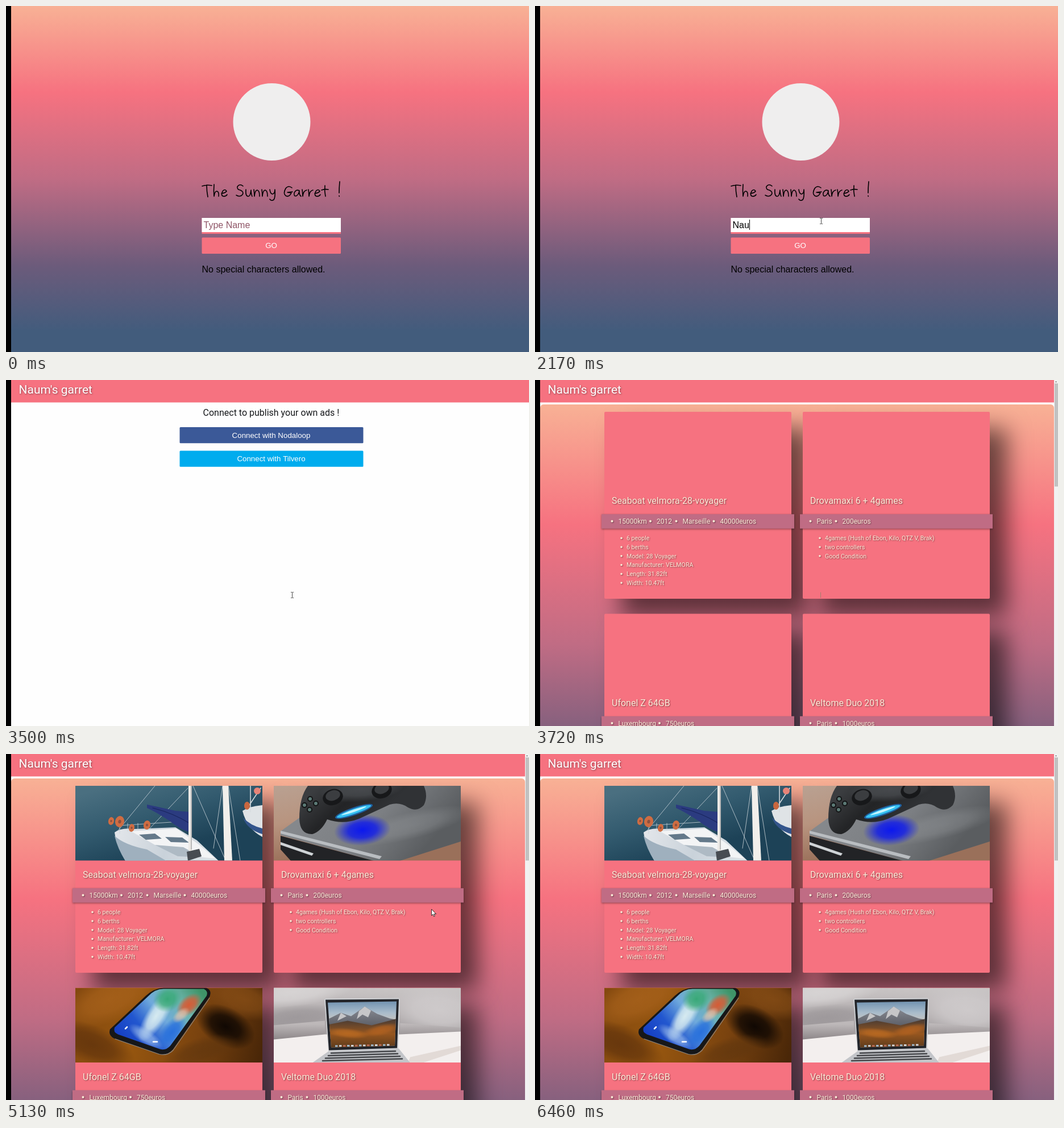
An HTML page with a canvas for the animation above (7930 ms loop, 920 px wide and 609 px high).

```html
<!DOCTYPE html>
<html lang="en">
<head>
<meta charset="utf-8">
<title>Small ads</title>
<style>
html, body { margin: 0; width: 100%; height: 100%; overflow: hidden; background: #fff; }
canvas { display: block; width: 920px; height: 609px; }
</style>
</head>
<body>
<canvas id="stage" width="920" height="609" role="img" aria-label="The Sunny Garret !"></canvas>
<script>
const W = 920, H = 609, LOOP = 7930;
const SANS = '"Liberation Sans", Arial, sans-serif';
const ROBOTO = 'Roboto, sans-serif';
const PINK = '#f67280', MAUVE = '#c06c84', CREAM = '#fdebd8';
const SKY = ['#f8b195', PINK, MAUVE, '#6c5b7b', '#355c7d'];
const USER = 'Naum';

const stage = document.getElementById('stage').getContext('2d');
let c = stage;

// ---------- helpers ----------
function layer(draw) {
  const cv = document.createElement('canvas');
  cv.width = W;
  cv.height = H;
  c = cv.getContext('2d');
  draw();
  c = stage;
  return cv;
}

function rect(x, y, w, h, fill, r = 0) {
  c.fillStyle = fill;
  c.beginPath();
  c.roundRect(x, y, w, h, r);
  c.fill();
}

function dot(x, y, r, fill) {
  c.fillStyle = fill;
  c.beginPath();
  c.arc(x, y, r, 0, 7);
  c.fill();
}

function oval(x, y, rx, ry, turn, fill) {
  c.fillStyle = fill;
  c.beginPath();
  c.ellipse(x, y, rx, ry, turn, 0, 7);
  c.fill();
}

function shape(fill, d) {
  c.fillStyle = fill;
  c.fill(new Path2D(d));
}

function line(color, width, d) {
  c.strokeStyle = color;
  c.lineWidth = width;
  c.lineCap = c.lineJoin = 'round';
  c.stroke(new Path2D(d));
}

function linear(x0, y0, x1, y1, ...colors) {
  const g = c.createLinearGradient(x0, y0, x1, y1);
  colors.forEach((col, i) => g.addColorStop(i / (colors.length - 1), col));
  return g;
}

// Soft spot that fades out; rgb is 'r,g,b'.
function glow(x, y, rx, ry, turn, rgb, alpha = 1) {
  c.save();
  c.translate(x, y);
  c.rotate(turn);
  c.scale(rx, ry);
  const g = c.createRadialGradient(0, 0, 0, 0, 0, 1);
  g.addColorStop(0, `rgba(${rgb},${alpha})`);
  g.addColorStop(0.5, `rgba(${rgb},${alpha * 0.8})`);
  g.addColorStop(1, `rgba(${rgb},0)`);
  dot(0, 0, 1, g);
  c.restore();
}

function text(str, x, y, size, fill, font = SANS, align = 'left') {
  c.font = size + 'px ' + font;
  c.textAlign = align;
  c.fillStyle = fill;
  c.fillText(str, x, y);
}

function shaded(alpha, dx, dy, blur, draw) {
  c.save();
  c.shadowColor = `rgba(0,0,0,${alpha})`;
  c.shadowOffsetX = dx;
  c.shadowOffsetY = dy;
  c.shadowBlur = blur;
  draw();
  c.restore();
}

// ---------- handwritten title: advance width and strokes ----------
const PEN = {
  T: [19, 'M0-18Q8-21 17-19M8-20Q8-9 10 1'],
  h: [14, 'M2-21Q1-10 2 0Q3-9 7-9Q11-8 10 0'],
  e: [13, 'M1-5Q8-6 10-9Q7-14 3-9Q-1-1 5 0Q9 0 11-3'],
  S: [16, 'M12-18Q6-23 2-17Q1-12 7-11Q14-8 11-3Q7 2 0-2'],
  u: [14, 'M1-12Q0 0 5 0Q9 0 10-11Q10-4 12 0'],
  n: [14, 'M1-12Q2-5 2 0Q3-11 7-11Q11-10 11 0'],
  y: [13, 'M1-12Q2-4 6-4Q10-5 10-12Q11 2 8 6Q4 9 1 5'],
  G: [18, 'M15-15Q9-20 4-14Q-1-5 4-1Q10 2 14-6L7-7L16-8'],
  a: [14, 'M10-10Q4-13 1-6Q0 1 5-1Q9-3 10-10Q9-3 13 0'],
  r: [11, 'M1-12Q2-5 2 0Q3-10 9-11'],
  t: [13, 'M6-19Q5-9 7 0M0-11Q6-13 12-12'],
  '!': [6, 'M3-26Q2-15 2-6M2-1L2.3 0'],
};

function write(word, x, y) {
  for (const ch of word) {
    c.save();
    c.translate(x, y);
    line('#000', 1.6, PEN[ch][1]);
    c.restore();
    x += PEN[ch][0];
  }
}

// ---------- pages ----------
const edge = () => rect(0, 0, 9, H, '#000');

function login() {
  rect(0, 0, W, H, linear(0, 0, 0, H, ...SKY));
  rect(0, 571, W, H - 571, '#425c7c');
  edge();
  dot(467.5, 204, 68, '#efeeee');
  write('The', 345, 335);
  write('Sunny', 405, 335);
  write('Garret', 488, 335);
  write('!', 584, 335);
  rect(344.5, 373, 244.5, 28, PINK);
  rect(344.5, 373, 244.5, 25, '#fff');
  rect(344.5, 407.5, 244.5, 28.5, PINK, 1.5);
  text('GO', 466.5, 426, 13.33, '#fff', SANS, 'center');
  text('No special characters allowed.', 344.5, 469, 16, '#000');
}

function header(width) {
  rect(9, 0, width, 39.5, PINK);
  shaded(0.4, 1, 1, 3, () => text(USER + "'s garret", 22.5, 24, 21, '#fff', ROBOTO));
}

function connect() {
  rect(0, 0, W, H, '#fefefe');
  edge();
  header(911);
  text('Connect to publish your own ads !', 466.5, 63, 16, '#16181b', ROBOTO, 'center');
  [['Nodaloop', 83, '#3b5998'], ['Tilvero', 124.5, '#00acee']].forEach(([name, y, fill]) => {
    rect(305.5, y, 323, 28.3, fill, 1.5);
    text('Connect with ' + name, 466.5, y + 18.5, 13.33, '#fff', SANS, 'center');
  });
}

const CARDS = [
  { x: 122, y: 56, photo: boat, title: 'Seaboat velmora-28-voyager',
    tags: [[13.5, '15000km'], [81, '2012'], [126.5, 'Marseille'], [192.5, '40000euros']],
    items: ['6 people', '6 berths', 'Model: 28 Voyager', 'Manufacturer: VELMORA',
            'Length: 31.82ft', 'Width: 10.47ft'] },
  { x: 471, y: 56, photo: gamepad, title: 'Drovamaxi 6 + 4games',
    tags: [[13.5, 'Paris'], [58.5, '200euros']],
    items: ['4games (Hush of Ebon, Kilo, QTZ V, Brak)', 'two controllers', 'Good Condition'] },
  { x: 122, y: 411.5, photo: phone, title: 'Ufonel Z 64GB',
    tags: [[13.5, 'Luxembourg'], [97, '750euros']], items: [] },
  { x: 471, y: 411.5, photo: laptop, title: 'Veltome Duo 2018',
    tags: [[13.5, 'Paris'], [58.5, '1000euros']], items: [] },
];

function card({ x, y, photo, title, tags, items }, withPhoto) {
  shaded(0.57, 30, 30, 40, () => rect(x, y, 329, 329, PINK, 2));
  if (withPhoto) {
    c.save();
    c.beginPath();
    c.rect(x, y, 329, 131.5);
    c.clip();
    c.translate(x, y);
    photo();
    c.restore();
  }
  shaded(0.35, 0, 1, 3, () => rect(x - 5, y + 180.3, 339, 25.2, MAUVE));
  shaded(0.45, 1, 1, 2, () => {
    text(title, x + 13, y + 162, 16, CREAM, ROBOTO);
    tags.forEach(([dx, str]) => {
      dot(x + dx, y + 192.5, 2, CREAM);
      text(str, x + dx + 11, y + 197, 12, CREAM, ROBOTO);
    });
    items.forEach((str, i) => {
      const cy = y + 222.3 + i * 15.75;
      dot(x + 30, cy, 1.8, CREAM);
      text(str, x + 39, cy + 3.7, 10.6, CREAM, ROBOTO);
    });
  });
}

function list(withPhoto) {
  rect(0, 0, W, H, '#fff');
  rect(9, 43, 904, 845, linear(0, 43, 0, 888, ...SKY), 6);
  edge();
  header(904);
  CARDS.forEach(item => card(item, withPhoto));
  rect(913, 0, 7, H, '#f1f1f1');
  rect(914, 6, 6, 181.5, '#c1c1c1');
  shape('#777', 'M914.8 4L918.2 4L916.5 2Z');
}

// ---------- photos, in card space 329 x 131.5 ----------
function boat() {
  rect(0, 0, 329, 132, linear(60, 0, 100, 132, '#4a6f80', '#335b6f', '#1d4257'));
  shape(linear(70, 80, 250, 132, '#e3e6ea', '#c9d2da', '#dfe4e8'),
    'M69 82Q80 73 104 76L176 73L214 96L252 132H88Q72 104 69 82Z');
  shape('#9fb0be', 'M69 88Q86 104 126 112L160 132H88Q74 110 69 88Z');
  shape('#f3f4f5', 'M98 80L178 75L218 104L246 128L190 122L140 104Z');
  shape('#64798a', 'M112 86L140 84L152 93L124 95ZM158 90L188 91L200 100L168 99Z');
  shape('#aebac4', 'M140 104L190 108L222 126L180 124Z');
  line('#c9d4da', 0.8, 'M140 0L74 80M198 4L128 78M207 0L262 126M76 70L200 62M78 70V84M92 66V80M110 66V78');
  shape('#2b3b80', 'M126 33Q150 38 176 44L203 46V82Q186 78 166 62Q142 46 126 39Z');
  line('#18245c', 1.2, 'M136 39Q172 48 201 66');
  line('#eceae6', 6, 'M202-4V112');
  line('#98979a', 1.2, 'M204 0V112');
  shape('#f1efeb', 'M259 0H269L276 132H262Z');
  line('#cfd6da', 0.8, 'M259 0L243 110M269 0L290 132');
  shape('#474c52', 'M196 116L218 111L222 124L198 132Z');
  [[63, 62, 5], [78, 63, 8], [99, 74, 5], [126, 69, 6]].forEach(([x, y, r]) => {
    oval(x, y, r, r + 2, 0.2, '#cf6c42');
    oval(x, y, r / 3, r / 2.5, 0.2, '#8b5140');
  });
  shape('#dfe3e6', 'M294 44Q306 36 329 34V90Q302 76 294 44Z');
  shape('#34558c', 'M295 56Q308 70 329 75V85Q302 77 295 56Z');
  line('#d8dde0', 1.5, 'M308 0V46M326 4L298 46');
  oval(302, 35, 5, 7, 0, '#c9673f');
  dot(320, 9, 6, '#e78478');
}

function gamepad() {
  rect(0, 0, 329, 132, linear(0, 0, 30, 132, '#b9a192', '#b8947f', '#9a705a'));
  shape(linear(90, 10, 240, 140, '#85888c', '#7c7f83', '#5a5d60'),
    'M12 80L90 24L180 0H329V98L222 132H176L12 87Z');
  shape('#222326', 'M12 88L176 132H30L12 112Z');
  shape('#b9bdc1', 'M12 79L190 124L186 129L12 84Z');
  shape('#cfd3d6', 'M12 99L70 119L67 123L12 104Z');
  glow(240, 70, 110, 24, -0.25, '160,163,166', 0.35);
  glow(156, 78, 50, 27, -0.1, '12,24,238');
  shape(linear(80, 0, 150, 80, '#3b3d40', '#232426', '#303235'),
    'M60 0H264Q272 18 264 34Q252 47 236 38Q222 28 204 33L150 58Q122 69 94 59Q84 80 68 85Q46 86 45 58Q45 20 60 0Z');
  glow(155, 6, 76, 22, -0.1, '80,83,87', 0.8);
  [[104, 20], [190, 8]].forEach(([x, y]) => {
    oval(x, y, 18, 14, -0.3, '#17181a');
    oval(x, y - 3, 13, 9, -0.3, '#3b3d40');
  });
  [[54, 34], [64, 23], [74, 31], [63, 42]].forEach(([x, y]) => {
    dot(x, y, 5, '#131415');
    dot(x, y, 3, '#5c7a76');
  });
  oval(141, 45, 35, 7, -0.33, '#1f5f9f');
  oval(141, 45, 32, 4.6, -0.33, '#35c2f2');
  oval(141, 44, 23, 2, -0.33, '#c2f4ff');
}

function phone() {
  rect(0, 0, 329, 132, linear(0, 20, 329, 100, '#84490f', '#96560f', '#7a430f', '#4a2708'));
  glow(60, 20, 90, 40, -0.4, '168,98,28', 0.8);
  glow(30, 100, 80, 34, 0.4, '92,48,12', 0.75);
  glow(296, 20, 70, 34, 0.3, '136,78,22', 0.8);
  glow(264, 68, 56, 34, 0.5, '16,8,3');
  glow(220, 112, 70, 24, -0.3, '96,54,14', 0.7);
  shape('#161719', 'M156 0H230Q241 4 236 16L172 108Q162 120 148 117L70 90Q57 84 61 73L124 14Q138 1 156 0Z');
  line('#8d8780', 1.2, 'M236 18L172 110Q162 120 148 117L70 90');
  c.save();
  c.clip(new Path2D('M155 2H226Q234 6 231 14L167 102Q159 111 149 108L75 82Q66 78 69 70L128 15Q140 2 155 2Z'));
  rect(60, 0, 180, 120, linear(90, 100, 215, 0, '#1640c4', '#2257cf', '#6fa9dc', '#6db5ae', '#3f9468'));
  glow(142, 50, 52, 18, -1, '214,234,240');
  glow(124, 86, 36, 13, 0.6, '190,218,242', 0.6);
  glow(170, 78, 34, 18, -0.9, '40,112,220');
  glow(162, 20, 26, 22, -0.5, '56,168,120');
  glow(200, 30, 26, 16, -0.7, '214,92,54');
  glow(186, 48, 18, 10, -0.7, '226,196,174', 0.8);
  c.restore();
  line('#fff', 2.5, 'M88 72L91 69M137 95L144 95');
}

function laptop() {
  rect(0, 0, 329, 132, linear(0, 0, 0, 90, '#c9c5c5', '#b4afb0', '#a09b9d'));
  glow(30, 8, 110, 26, -0.1, '216,213,213', 0.9);
  glow(290, 40, 90, 44, 0.1, '208,204,205', 0.9);
  glow(40, 52, 90, 22, -0.1, '150,145,148', 0.7);
  shape(linear(0, 64, 0, 90, '#bdb8b9', '#8f898b'), 'M0 66L90 58V82L0 92ZM222 62L329 70V82H222Z');
  shape('#f3efee', 'M0 91L90 82H222L329 77V132H0Z');
  shape('#e2dad6', 'M240 122L329 102V110L262 132H236Z');
  shape('#cfd1d4', 'M89 22Q89 19 92 19L218 18Q222 18 222 22L219 108L96 112Z');
  shape('#222429', 'M91 21L220 20L217 106L97 110Z');
  c.save();
  c.clip(new Path2D('M95 26L216 24L213 102L101 105Z'));
  rect(90, 20, 135, 90, linear(0, 22, 0, 66, '#6d8fae', '#a9bccb', '#d6c7ba'));
  shape(linear(0, 32, 0, 70, '#8b8e96', '#595b63'),
    'M90 58L118 44L136 50L160 33L182 46L204 54L225 58V110H90Z');
  shape('#c6c6c8', 'M160 33L171 40L166 52L156 47L146 55L150 41ZM118 44L128 50L112 58Z');
  shape(linear(0, 56, 0, 106, '#4a3c34', '#96561f', '#5b3a1c'),
    'M90 66L130 58L172 66L225 52V110H90Z');
  glow(130, 80, 38, 9, 0.1, '190,108,34', 0.8);
  glow(190, 74, 34, 10, -0.2, '184,100,32', 0.8);
  c.restore();
  for (let i = 0; i < 14; i++) {
    rect(108 + i * 7, 101 - i * 0.15, 4.5, 3, ['#9eb8cb', '#d2d4d7', '#bc6d54'][i % 3]);
  }
  shape('#c3c5c9', 'M96 112L220 107L240 132H68Z');
  for (let i = 0; i < 4; i++) {
    line('#44464a', 2.6, `M${101 - i * 5} ${115 + i * 4.5}L${214 + i * 4} ${111.5 + i * 4.5}`);
  }
}

const pages = {
  login: layer(login),
  connect: layer(connect),
  bare: layer(() => list(false)),
  full: layer(() => list(true)),
};

// ---------- pointer: start, end, steps, then from / bend / to ----------
const MOVES = [
  [70, 610, 8, [894, 653], [640, 400], [500, 370]],
  [840, 915, 2, [500, 370], [502, 375], [503, 379]],
  [4480, 5130, 9, [503, 379], [645, 318], [748, 273]],
  [5200, 5270, 2, [748, 273], [785, 274], [812, 284]],
  [5370, 5740, 6, [812, 284], [860, 300], [795, 220]],
  [5970, 6460, 7, [795, 220], [830, 380], [870, 665]],
];

function pointer(t) {
  const [t0, t1, n, from, bend, to] = MOVES.filter(m => t >= m[0]).pop();
  const k = Math.min(n - 1, Math.floor((t - t0) / (t1 - t0) * (n - 1) + 1e-6));
  const u = (k + 1) / n, v = 1 - u;
  return from.map((p, i) => v * v * p + 2 * u * v * bend[i] + u * u * to[i]);
}

function drawPointer(t) {
  if (t < 70 || t >= 6460) return;
  const [x, y] = pointer(t);
  c.save();
  c.translate(Math.round(x), Math.round(y));
  if (t >= 840 && t < 3720) {
    line('#4a4a4a', 1, 'M-1.5-5.5H-.5M1.5-5.5H2.5M.5-5V4M-1.5 4.5H-.5M1.5 4.5H2.5');
  } else if (t >= 3720 && t < 4480) {
    line('#a08070', 1, 'M-.5-5V4');
  } else {
    const arrow = 'M.5.5V11.4L3 9.1L4.7 13L6.4 12.2L4.8 8.5H8.2Z';
    shape('#fff', arrow);
    line('#222', 0.9, arrow);
  }
  c.restore();
}

// ---------- typing ----------
const KEYS = [1770, 2020, 2170, 2300];
const caretOn = t => (t >= 990 && t < 1450) || (t >= 1770 && t < 2850) || t >= 3400;

function drawField(t) {
  const typed = USER.slice(0, KEYS.filter(k => t >= k).length);
  text(typed || 'Type Name', 347.5, 391, 16, typed ? '#000' : '#8f5567');
  if (caretOn(t)) {
    rect(Math.round(347.8 + (typed ? c.measureText(typed).width : 0)), 376, 1, 18, '#000');
  }
}

function frame(now) {
  const t = now % LOOP;
  const page = t < 3500 ? 'login' : t < 3720 ? 'connect' : t < 3800 ? 'bare' : 'full';
  c.drawImage(pages[page], 0, 0);
  if (page === 'login') drawField(t);
  drawPointer(t);
}

const begin = performance.now();
function tick() {
  frame(performance.now() - begin);
  requestAnimationFrame(tick);
}
tick();
</script>
</body>
</html>
```
